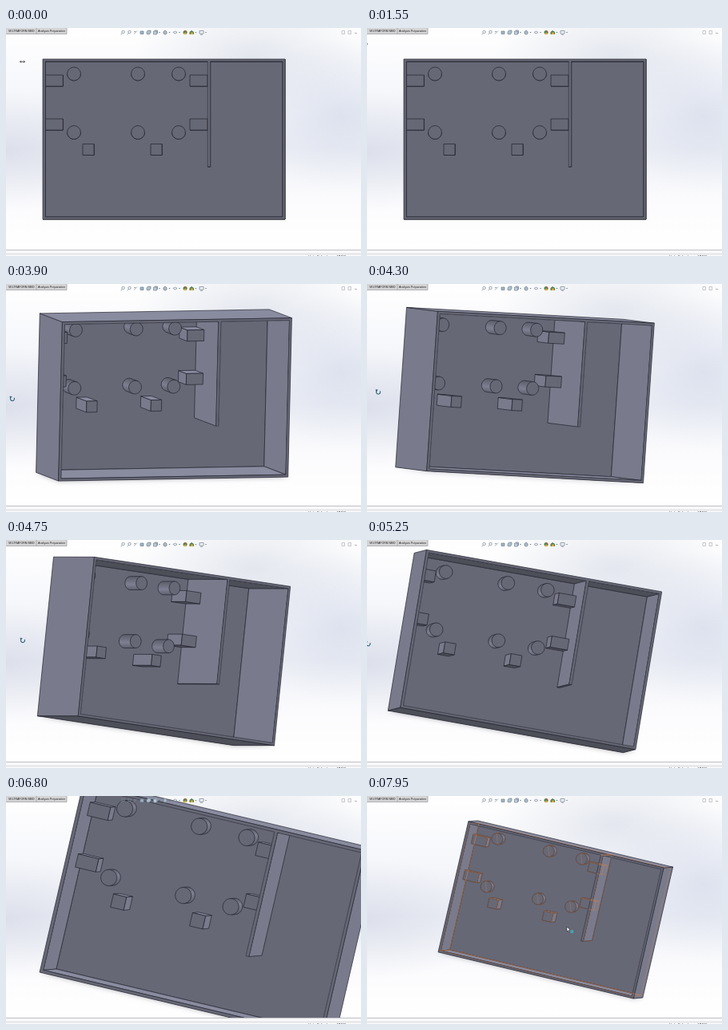
An HTML page with a canvas that plays this animation: 444x286 px, repeating every 8 s.

```html
<!DOCTYPE html>
<html lang="en">
<head>
<meta charset="utf-8">
<title>Enclosure view rotation</title>
<style>
  html, body { margin: 0; width: 100%; height: 100%; overflow: hidden; }
  body {
    position: relative;
    background:
      radial-gradient(ellipse 150px 75px at 310px 35px, rgba(204,210,224,.5), rgba(204,210,224,0)),
      radial-gradient(ellipse 130px 95px at 420px 110px, rgba(200,208,228,.5), rgba(200,208,228,0)),
      radial-gradient(ellipse 170px 75px at 0 155px, rgba(206,211,226,.55), rgba(206,211,226,0)),
      linear-gradient(#fefefe 8px, #f8f9fc 60px, #eef0f6 150px, #fbfbfd 215px, #fff 278px);
  }
  canvas, svg { position: absolute; left: 0; top: 0; width: 444px; height: 286px; display: block; }
  text { font-family: "Liberation Sans", Arial, sans-serif; font-size: 3.7px; fill: #222; }
</style>
</head>
<body>
<canvas id="view" width="444" height="286"></canvas>
<svg viewBox="0 0 444 286">
  <path d="M0 0H76V7.5H0Z" fill="#d4d4d6"/>
  <path d="M0 7.5H76V0M38 0V7.5" fill="none" stroke="#9a9a9e" stroke-width=".7"/>
  <text x="3" y="5.4" style="font-size:3.5px">VELTRAFORM MBD</text>
  <text x="40" y="5.4">Analysis Preparation</text>

  <g fill="none" stroke="#7d8b9b" stroke-width=".8">
    <circle cx="146.5" cy="5" r="1.7"/><path d="M145.3 6.4L143.5 8.3"/>
    <circle cx="154.5" cy="5" r="1.7"/><path d="M153.3 6.4L151.5 8.3"/>
    <path d="M160 7.5L164 3.5M160 4.5h2"/>
    <path d="M168 4h4v3.5h-4z" fill="#9db4c2"/>
    <path d="M176 7.5V4.5L178 3h3v3L179 8z" fill="#a9c3cf"/>
    <path d="M184.5 4h4v4h-4zM185.5 3h4v4" fill="#bcd0dc"/>
    <path d="M197 4.5L199 3l2 1.5V7L199 8.2 197 7z" fill="#a8bac8"/>
    <path d="M209 5.5q2.5-3 5 0q-2.5 3-5 0"/>
    <path d="M242 3.5h5v3.5h-5zM243 8.3h3"/>
    <path d="M420 3.5h3.5v4H420zM428 3.5h3.5v4H428z" stroke="#bcbcc2"/>
    <path d="M436 6.5h3" stroke="#a4a4aa"/>
  </g>
  <circle cx="224" cy="5.5" r="2.5" fill="#3f8b5b"/>
  <path d="M224 5.5V3a2.5 2.5 0 0 1 2.4 3z" fill="#d3503c"/>
  <path d="M224 5.5L226 7.2A2.5 2.5 0 0 1 222 7.2Z" fill="#e0b13f"/>
  <path d="M229.5 8V5l2.5-2 3 2v3z" fill="#4f7f52"/>
  <path d="M231 8V5.5h3V8z" fill="#d9a93c"/>
  <path d="M191 5h2l-1 1.2zM203.5 5h2l-1 1.2zM216 5h2l-1 1.2zM236.5 5h2l-1 1.2zM249 5h2l-1 1.2z" fill="#666"/>

  <path d="M0 278.5H444V286H0Z" fill="#f7f7f8"/>
  <path d="M0 278.5H444" stroke="#b9babf" stroke-width=".9"/>
  <path d="M0 283.5H444" stroke="#d2d2d6" stroke-width=".8"/>
  <text x="378" y="287.5">Under Defined</text>
  <text x="414" y="287.5">MMGS</text>
</svg>
<script>
const ctx = document.getElementById('view').getContext('2d');
const LOOP = 8000, STEP = 50;
const CX = 197.5, CY = 139.5, DEPTH = 88, FLOOR = 85;
const LINE = '#23232d', ORANGE = 'rgba(214,130,72,.65)';

// time, right axis, down axis, drag cursor
const poses = [
  [3400, [1, 0, 0], [0, 1, 0], [-5, 134]],
  [3900, [.947, -.0165, .32], [-.025, .99, .12], [8, 144]],
  [4750, [.81, .122, .575], [-.0945, .99, -.065], [21, 126]],
  [5700, [.954, .191, -.231], [-.219, .96, -.08], [-16, 134]],
  [6050, [.961, .229, -.15], [-.23, .971, .05], [-20, 139]]
];

// time, scale, centre
const zooms = [
  [0, 1, 197.5, 139.5],
  [6800, 1.21, 254, 144],
  [7300, 1.008, 244, 143.2],
  [7350, .838, 235.8, 142.5]
];

const outer = [46, 39, 0, 349, 240, DEPTH];
const inner = [49.3, 42, 0, 346, 237, FLOOR];
const wall = [252.3, 42, 0, 255.6, 174, FLOOR];
const block = (x, y, w, h, z) => ({ box: [x, y, z, x + w, y + h, FLOOR], mid: [x + w / 2, y + h / 2, z] });
const peg = (x, y) => ({ peg: [x, y], mid: [x, y, 61] });
const posts = [
  ...[59, 114].flatMap(y => [block(49.3, y, 22, 14, 54), block(230, y, 22, 14, 54)]),
  ...[96, 181].map(x => block(x, 145.5, 14, 14, 45)),
  ...[57.5, 131].flatMap(y => [85, 165, 216].map(x => peg(x, y)))
];

let R, D, B, zoom, edges;

const mix = (a, b, k) => a.map((v, i) => v + (b[i] - v) * k);
const dot = (a, b) => a[0] * b[0] + a[1] * b[1] + a[2] * b[2];
const unit = a => a.map(v => v / Math.hypot(...a));
const cross = (a, b) => [a[1] * b[2] - a[2] * b[1], a[2] * b[0] - a[0] * b[2], a[0] * b[1] - a[1] * b[0]];
const tone = v => `rgb(${v},${v + 2},${Math.round(v * 1.16)})`;

function setPose(t) {
  const last = poses.length - 1;
  let i = 0;
  while (i < last - 1 && t > poses[i + 1][0]) i++;
  const a = poses[i], b = poses[i + 1];
  const k = Math.min(1, Math.max(0, (t - a[0]) / (b[0] - a[0])));
  R = unit(mix(a[1], b[1], k));
  const down = mix(a[2], b[2], k), skew = dot(R, down);
  D = unit(down.map((v, j) => v - R[j] * skew));
  B = cross(R, D);
  zoom = zooms.filter(z => z[0] <= t).pop();
  return mix(a[3], b[3], k);
}

function along(axis, x, y, z) {
  return R[axis] * (x - CX) + D[axis] * (y - CY) + B[axis] * (z - DEPTH / 2);
}

function project([x, y, z]) {
  return [zoom[2] + zoom[1] * along(0, x, y, z), zoom[3] + zoom[1] * along(1, x, y, z)];
}

function trace(points) {
  const path = new Path2D();
  points.forEach((p, i) => path[i ? 'lineTo' : 'moveTo'](...project(p)));
  path.closePath();
  return path;
}

function face(points, fill, keep = true) {
  const path = trace(points);
  ctx.fillStyle = fill;
  ctx.fill(path);
  ctx.stroke(path);
  if (keep) edges.push(path);
}

const rect = (x0, y0, x1, y1, z) => [[x0, y0, z], [x1, y0, z], [x1, y1, z], [x0, y1, z]];
const level = (x0, x1, y, z0, z1) => [[x0, y, z0], [x1, y, z0], [x1, y, z1], [x0, y, z1]];

// The two side faces turned to the viewer
function sides([x0, y0, z0, x1, y1, z1], inside, keep = true) {
  const x = (R[2] > 0) !== inside ? x0 : x1;
  const y = (D[2] > 0) !== inside ? y0 : y1;
  face([[x, y0, z0], [x, y1, z0], [x, y1, z1], [x, y0, z1]], tone(121), keep);
  face(level(x0, x1, y, z0, z1), tone(D[2] > 0 ? 137 : 76), keep);
}

function drawPeg([x, y]) {
  const r = 8.4, top = 61;
  const at = (a, z) => [x + r * Math.cos(a), y + r * Math.sin(a), z];
  const arc = (from, span, z) => Array.from({ length: 25 }, (_, i) => at(from + span * i / 24, z));
  let a = Math.atan2(D[0] * B[1] - D[1] * B[0], R[0] * B[1] - R[1] * B[0]);
  const m = a + Math.PI / 2;
  const ahead = [0, 1].reduce((s, i) => s + (R[i] * Math.cos(m) + D[i] * Math.sin(m)) * B[i], 0);
  if (ahead < 0) a += Math.PI;
  const p = project(at(a, top)), q = project(at(a + Math.PI, top));
  const shade = ctx.createLinearGradient(...p, ...q);
  shade.addColorStop(0, tone(94));
  shade.addColorStop(.4, tone(126));
  shade.addColorStop(1, tone(90));
  face([at(a, top), ...arc(a, Math.PI, FLOOR), at(a + Math.PI, top)], shade);
  face(arc(0, Math.PI * 2, top), tone(102));
}

function drawPost(post) {
  if (post.peg) return drawPeg(post.peg);
  const b = post.box;
  sides(b, false);
  face(rect(b[0], b[1], b[3], b[4], b[2]), tone(102));
}

function drawShadow() {
  ctx.save();
  ctx.shadowColor = 'rgba(70,72,85,.45)';
  ctx.shadowBlur = 6;
  ctx.fillStyle = tone(102);
  ctx.fill(trace(level(outer[0], outer[3], outer[4], 0, DEPTH)));
  ctx.restore();
}

function drawModel(lit) {
  edges = [];
  drawShadow();
  ctx.lineWidth = .7;
  ctx.lineJoin = 'round';
  ctx.strokeStyle = LINE;
  sides(outer, false, false);

  const [x0, y0, , x1, y1] = inner, [w0, , , w1, wy] = wall;
  const opening = [[x0, y0, 0], [w0, y0, 0], [w0, wy, 0], [w1, wy, 0], [w1, y0, 0], [x1, y0, 0], [x1, y1, 0], [x0, y1, 0]];
  const hole = trace(opening);

  ctx.save();
  ctx.clip(hole);
  face(rect(x0, y0, x1, y1, FLOOR), tone(102));
  sides(inner, true);
  if (R[2] > 0) sides(wall, false);
  const far = p => along(2, ...p.mid);
  [...posts].sort((a, b) => far(b) - far(a)).forEach(drawPost);
  if (R[2] <= 0) sides(wall, false);
  ctx.restore();

  const ring = trace(rect(outer[0], outer[1], outer[3], outer[4], 0));
  ring.addPath(hole);
  ctx.fillStyle = tone(102);
  ctx.fill(ring, 'evenodd');
  ctx.stroke(ring);

  if (lit) {
    ctx.strokeStyle = ORANGE;
    ctx.lineWidth = .5;
    edges.forEach(e => ctx.stroke(e));
  }
}

function cursor(x, y, draw) {
  ctx.save();
  ctx.translate(x, y);
  draw();
  ctx.restore();
}

function resizeArrow() {
  ctx.strokeStyle = '#333';
  ctx.lineWidth = .8;
  ctx.stroke(new Path2D('M-3 0H3M-1.5-1.5L-3 0L-1.5 1.5M1.5-1.5L3 0L1.5 1.5'));
}

function rotateArrow() {
  ctx.strokeStyle = ctx.fillStyle = '#2b5f7e';
  ctx.lineWidth = 1.1;
  ctx.beginPath();
  ctx.arc(0, 0, 2.5, -.5, 3.9);
  ctx.stroke();
  ctx.fill(new Path2D('M-3.5-3.2L-.2-3L-2.8-.4Z'));
}

function pointer() {
  ctx.fillStyle = '#fff';
  ctx.strokeStyle = '#222';
  ctx.lineWidth = .6;
  const p = new Path2D('M0 0V6L1.5 4.7L2.6 7L3.5 6.6L2.5 4.3H4.3Z');
  ctx.fill(p);
  ctx.stroke(p);
}

function partPointer() {
  pointer();
  ctx.fillStyle = '#4b9fb2';
  ctx.fillRect(4.2, 4, 4, 4);
}

function render(t) {
  ctx.clearRect(0, 0, 444, 286);
  const [dx, dy] = setPose(t);
  const k = Math.min(1, (t - 7650) / 300);
  const glide = 1 - (1 - k) ** 2;
  const hx = 7 + 243 * glide, hy = 139 + 25 * glide;
  drawModel(t >= 7650 && hx > 105);

  if (t < 600) cursor(20.5, 42.3, resizeArrow);
  else if (t < 650) cursor(8, 39, resizeArrow);
  else if (t >= 1550 && t < 1600) cursor(-2.5, 20, resizeArrow);
  else if (t >= 2550 && t < 3100) cursor(-5 + 11 * Math.sin(Math.PI * (t - 2520) / 600), 127, pointer);
  else if (t >= 3450 && t < 6050) cursor(dx, dy, rotateArrow);
  else if (t >= 7650) cursor(hx, hy, partPointer);
}

const start = performance.now();
function tick() {
  const t = (performance.now() - start) % LOOP;
  render(Math.floor(t / STEP) * STEP);
  requestAnimationFrame(tick);
}
tick();
</script>
</body>
</html>
```
